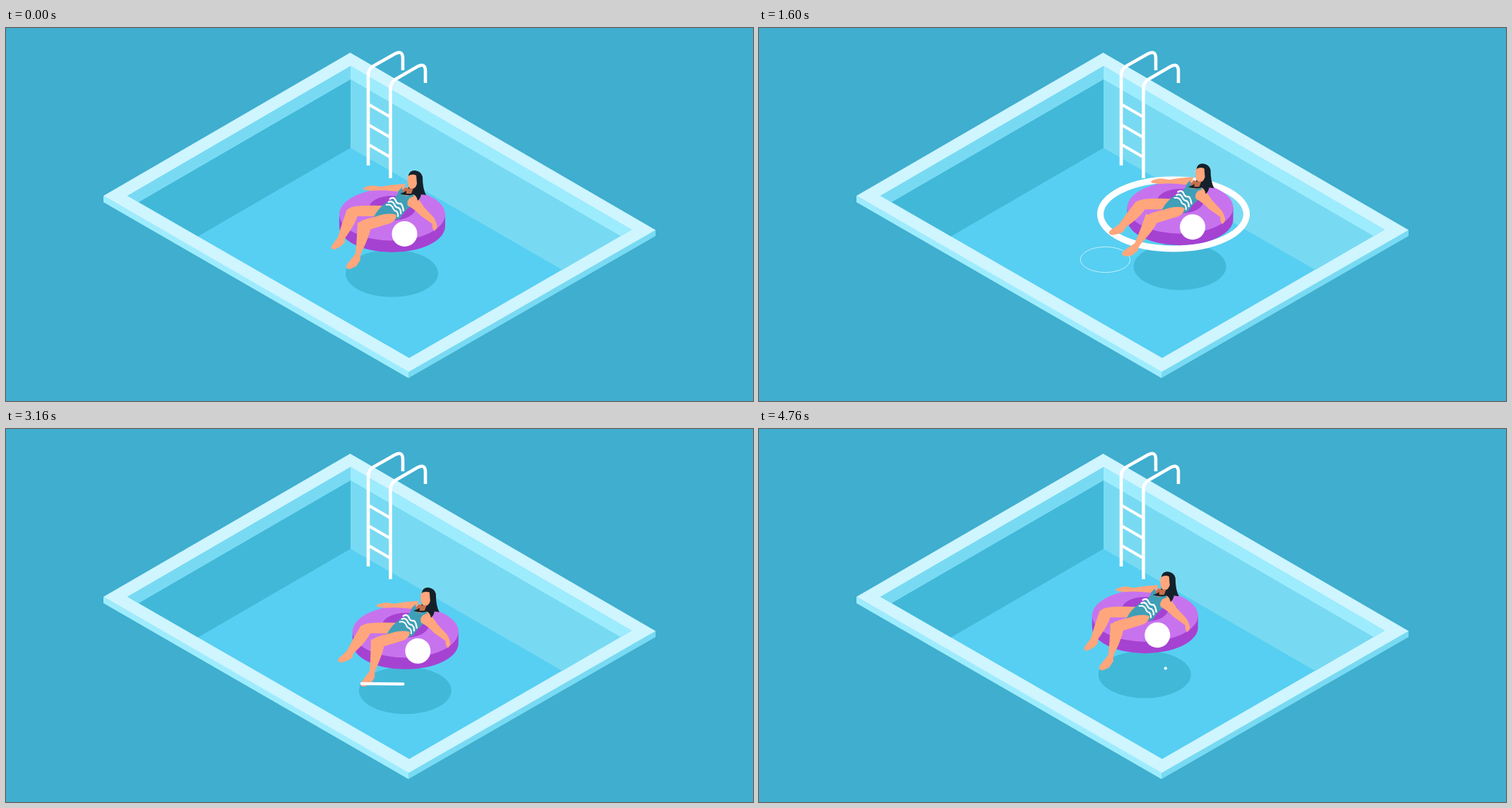
Write an HTML page with a canvas that moves like this. It is 1058 px wide and 529 px high and loops after 4.8 s.

```html
<!DOCTYPE html>
<html lang="en">
<head>
<meta charset="utf-8">
<title>Pool float</title>
<style>
html, body { margin: 0; width: 100%; height: 100%; overflow: hidden; background: #3faecf; }
canvas { display: block; width: 100vw; height: 100vh; }
</style>
</head>
<body>
<canvas id="stage" width="1058" height="529"></canvas>
<script>
const ctx = document.getElementById('stage').getContext('2d');
const LOOP = 4800;
const SKIN = '#ffa67c', HAIR = '#15212a', SUIT = '#3f9fb8';
const LILAC = '#c873ee', PURPLE = '#a642d2', SHADE = '#42b8d8', AQUA = '#78daf2', ICE = '#9decfe';

// Drift of the float and swing of the shins
const times = [0, 560, 960, 1160, 1680, 2040, 2240, 2680, 3000, 3360, 3600, 4080, 4480];
const driftX = [0, 5, 19, 28, 53, 64, 64, 48, 28, 9, 3, -3, -1];
const driftY = [0, -4, -11, -11.5, -9, -0.5, 7, 22, 23.5, 21, 16.5, 6, 1];
const leftShin = [0, 4, 12, 16, 19, 19, 18.5, 16, 13, 9, 6, 1, 0];
const rightShin = [0, 5, 12, 14, 17, 16, 13, 2, -1, -2, -2, 0, 0];

// Smooth periodic curve through the keys
function track(keys, t) {
  const n = times.length;
  const at = i => times[(i + n) % n] + LOOP * Math.floor(i / n);
  const val = i => keys[(i + n) % n];
  const slope = i => (val(i + 1) - val(i - 1)) / (at(i + 1) - at(i - 1));
  let i = n - 1;
  while (times[i] > t) i--;
  const span = at(i + 1) - at(i), u = (t - at(i)) / span, v = 1 - u;
  return val(i) * v * v * (1 + 2 * u) + val(i + 1) * u * u * (3 - 2 * u)
    + span * u * v * (slope(i) * v - slope(i + 1) * u);
}

const clamp = x => Math.min(1, Math.max(0, x));

function fill(d, color) {
  ctx.fillStyle = color;
  ctx.fill(new Path2D(d));
}

function line(d, width, color = '#fff') {
  ctx.strokeStyle = color;
  ctx.lineWidth = width;
  ctx.stroke(new Path2D(d));
}

function oval(x, y, rx, ry, color) {
  ctx.fillStyle = color;
  ctx.beginPath();
  ctx.ellipse(x, y, rx, ry, 0, 0, 7);
  ctx.fill();
}

function ripple(x, y, rx, ry, width) {
  const h = width / 2;
  ctx.strokeStyle = '#fff';
  ctx.lineWidth = width;
  ctx.beginPath();
  ctx.ellipse(x, y, Math.max(0, rx - h), Math.max(0, ry - h), 0, 0, 7);
  ctx.stroke();
}

function turned(x, y, degrees, draw) {
  ctx.save();
  ctx.translate(x, y);
  ctx.rotate(degrees * Math.PI / 180);
  ctx.translate(-x, -y);
  draw();
  ctx.restore();
}

function pool() {
  ctx.fillStyle = '#3faecf';
  ctx.fillRect(0, 0, 1058, 529);
  fill('M138 238V247L570 496.500V486Z', ICE);
  fill('M920 286V295L570 496.500V486Z', AQUA);
  fill('M487.500 35L920 286.500L570.500 487.500L138 238Z', '#cff5ff');
  fill('M488 54L886 286L571 468L172 238Z', '#57cff2');
  fill('M488 54V73L188 247L172 238Z', AQUA);
  fill('M488 54L886 286L870 295L488 73Z', ICE);
  fill('M488 73V170L272 295.500L188 247Z', SHADE);
  fill('M488 73L870 295L788 343L488 170Z', AQUA);
}

function ladder() {
  ctx.lineCap = 'butt';
  line('M513 108L544 126M513 137L544 155M513 165L544 183', 4.2);
  line('M513 195V67Q513 58 521 53.500L551 36.500Q562 31 562 43V60', 4.6);
  line('M544.500 213V86Q544.500 77 552 72.500L583 54.500Q594 49 594 61V78', 4.6);
}

function ripples(t) {
  if (t > 600 && t < 2840) {
    const left = Math.max(0, (2800 - t) / 1640);
    const r = 120.5 - 25.5 * left ** 2.3;
    ripple(576 + (t - 1160) * 0.025, 264, r, r * 0.495, 0.5 + 22 * left ** 3);
  }
  if (t > 640 && t < 1750) {
    const left = (1750 - t) / 1190, r = 35.5 * (1 - left ** 4);
    ripple(490.5, 328.5, r, r * 0.52, 5 * left);
  }
}

function ring() {
  fill('M472 264V281A75 37 0 0 0 622 281V264Z', PURPLE);
  oval(547, 264.5, 75, 37, LILAC);
  oval(547, 255.5, 33, 17.5, PURPLE);
  oval(564.5, 292, 18, 18, '#fff');
}

function woman(t) {
  // far arm and leg
  fill('M566 221Q546 222 531 225Q516 221 506 227Q504 230 512 230L517 231Q536 229 561 233Z', SKIN);
  turned(490, 262, track(leftShin, t), () =>
    fill('M483 257Q476 276 470 297L461 309Q459 315 466 314L475 309L480 304Q479 298 483 294Q495 277 498 266Z', SKIN));
  fill('M535 252Q508 251 493 253Q482 255 482 263Q488 269 498 267L528 267Z', SKIN);

  // torso
  fill('M565 225L578 229L584 241L572 252L560 242Z', SKIN);
  fill('M566 226L574 228L571 237L564 237L560 232Z', '#c86f4d');
  fill('M556 231L561 226L563 237Q571 240 575 233L579 240Q573 247 573 253Q564 260 558 270Q539 278 521 268Q527 255 541 246Q554 241 556 231Z', SUIT);
  ctx.lineCap = 'butt';
  line('M543 243Q549 238 552 245Q554 250 559 249Q562 251 563 260', 2.3);
  line('M541 247Q547 244 550 250Q552 255 556 255Q560 258 559 264', 2.3);
  line('M538 251Q545 249 548 255Q549 259 553 260Q556 263 555 268', 2);

  // near arm and leg
  fill('M579 238Q586 244 592 254L606 269Q612 280 610 284L607 288Q603 284 604 278L587 266Q579 257 569 252Q567 245 572 241Z', SKIN);
  turned(506, 276, track(rightShin, t), () =>
    fill('M498 275Q497 300 495 320L483 335Q479 342 487 342L496 338L502 329Q501 322 505 315Q514 297 517 282Z', SKIN));
  fill('M553 265Q541 261 522 268Q507 271 501 275Q496 281 502 285Q509 288 518 285L544 277Q553 273 553 265Z', SKIN);

  // head
  fill('M570 210Q571 202 579 202Q588 203 590 211Q590 228 595 237L588 236Q587 242 583 245Q582 238 577 236Q570 239 558 235Q569 232 570 226Z', HAIR);
  fill('M568.500 211Q574 206 581 209L582 221Q580 229 573 228Q568 226 568.500 211Z', SKIN);
  fill('M567 227L573 228L577 227L574 235L567 235Z', '#c86f4d');
}

// Wake stroke that grows from the toe, then shortens to its far end
function wake(t) {
  if (t < 2660) return;
  const p = clamp((t - 2660) / 840);
  const end = p * p * (3 - 2 * p);
  const start = 1 - (1 - clamp((t - 3580) / 1190)) ** 2.3;
  const x = u => 485 + 91 * u, y = u => 338.3 + 0.9 * u;
  ctx.lineCap = 'round';
  line(`M${x(start)} ${y(start)}L${x(end) + 0.1} ${y(end)}`, 4.2);
}

function frame(now) {
  const t = now % LOOP;
  pool();
  ladder();
  const dx = track(driftX, t), dy = track(driftY, t);
  oval(546.5 + dx, 348 + dy, 65.5, 33.5, SHADE);
  ripples(t);
  ctx.save();
  ctx.translate(dx, dy);
  ring();
  woman(t);
  wake(t);
  ctx.restore();
  requestAnimationFrame(frame);
}
requestAnimationFrame(frame);
</script>
</body>
</html>
```
